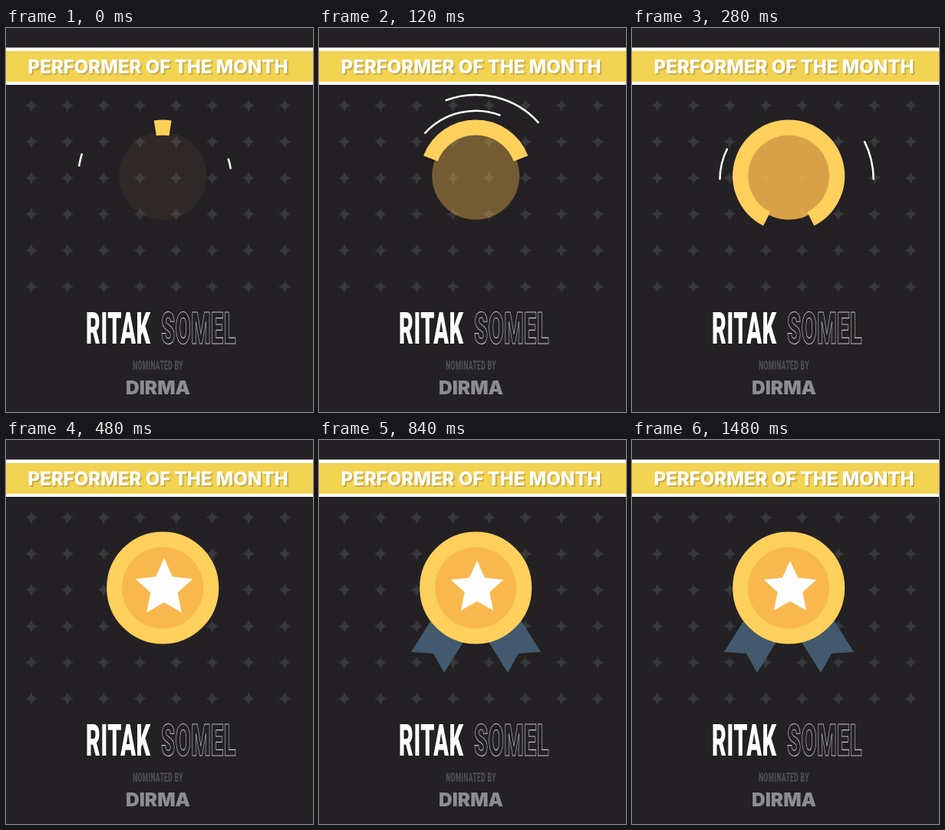
Recreate the animation shown at these times as an HTML page. Size 400 by 500 pixels, loop 1.52 s.

```html
<!DOCTYPE html>
<html lang="en">
<head>
<meta charset="utf-8">
<title>Performer of the month</title>
<style>
  html, body { margin: 0; height: 100%; overflow: hidden; background: #232124; }
  svg { display: block; width: 100vw; height: 100vh; }
  text { font-family: Inter, sans-serif; font-weight: 900; }
  .title { font-size: 24px; font-weight: 800; fill: #fff; text-anchor: middle;
    filter: drop-shadow(2px 2px .3px #c9ad48); }
  .narrow text { font-family: Roboto, sans-serif; }
  .name { font-size: 58px; letter-spacing: 1px; }
  .outline { fill: none; stroke: #c8c8ca; stroke-width: 1.1px; }
  .label { font-size: 17px; letter-spacing: .7px; fill: #4e4d50; text-anchor: middle; }
  .nominator { font-size: 24.5px; fill: #8d8c8e; text-anchor: middle; }
  .streak { fill: none; stroke: #fff; stroke-width: 2.5px; }
</style>
</head>
<body>
<svg viewBox="0 0 400 500">
  <defs>
    <pattern id="sparkles" x="9.4" y="77.4" width="47.17" height="47.17" patternUnits="userSpaceOnUse">
      <path transform="translate(23.6 23.6)" fill="#39383b"
        d="M0-8.5Q1.3-1.3 8.5 0Q1.3 1.3 0 8.5Q-1.3 1.3-8.5 0Q-1.3-1.3 0-8.5Z"/>
    </pattern>
  </defs>
  <rect width="400" height="500" fill="#232124"/>
  <rect x="9.4" y="77.4" width="377.3" height="283" fill="url(#sparkles)"/>

  <rect y="25.5" width="400" height="48.5" fill="#fff"/>
  <rect y="30" width="400" height="40" fill="#f3d352"/>
  <text class="title" x="198" y="59">PERFORMER OF THE MONTH</text>

  <g id="ribbons" fill="#42596e">
    <path id="left" d="M120 276L149 278L163 303L205 236L162 209Z"/>
    <path id="right" d="M289 276L260 278L246 303L204 236L247 209Z"/>
  </g>
  <circle id="disc" cx="204.2" cy="192.5" r="57" fill="#f8b84e"/>
  <path id="ring" fill="none" stroke="#ffd05c" stroke-width="20"/>
  <path id="star" fill="#fdfdfe"/>
  <path id="outer" class="streak"/>
  <path id="inner" class="streak"/>

  <g class="narrow" transform="scale(.5 1)">
    <text class="name" x="208" y="411.5" fill="#fff">RITAK</text>
    <text class="name outline" x="404" y="411.5">SOMEL</text>
    <text class="label" x="396" y="445.5">NOMINATED BY</text>
  </g>
  <text class="nominator" x="198" y="477">DIRMA</text>
</svg>
<script>
  const LOOP = 1520, STEP = 40, CX = 204.2;
  const el = id => document.getElementById(id);
  const clamp = v => Math.min(1, Math.max(0, v));
  const progress = (t, start, end) => clamp((t - start) / (end - start));
  const easeOutBack = (u, s) => 1 + (s + 1) * (u - 1) ** 3 + s * (u - 1) ** 2;

  // Point on a circle, angle in degrees clockwise from the top.
  const polar = (cx, cy, r, deg) => {
    const a = deg * Math.PI / 180;
    return `${(cx + r * Math.sin(a)).toFixed(2)} ${(cy - r * Math.cos(a)).toFixed(2)}`;
  };
  const arc = (cy, r, from, to) =>
    `M${polar(CX, cy, r, from)}A${r} ${r} 0 ${+(to - from > 180)} 1 ${polar(CX, cy, r, to)}`;
  const setPath = (id, d) => el(id).setAttribute('d', d);

  // Piecewise linear value through [time, value] keys.
  function track(t, keys) {
    const i = keys.findIndex(k => k[0] > t);
    if (i < 0) return keys.at(-1)[1];
    const [t0, v0] = keys[i - 1], [t1, v1] = keys[i];
    return v0 + (v1 - v0) * (t - t0) / (t1 - t0);
  }
  const DRAW = [[0, .05], [80, .25], [200, .65], [280, .85], [340, 1]];

  const starPoints = Array.from({ length: 10 }, (_, i) => polar(0, 0, i % 2 ? 17 : 36, i * 36));
  setPath('star', `M${starPoints.join('L')}Z`);

  function render(t) {
    const p = track(t, DRAW);
    el('disc').setAttribute('opacity', p);
    const half = p < 1 ? 180 * p : 181;
    setPath('ring', arc(192.5, 63, -half, 0) + arc(192.5, 63, 0, half));

    // Streaks sweep a half circle in opposite directions, the head twice as fast as the tail.
    const tail = 180 * p - 90, head = 180 * Math.min(1, 2 * p) - 90;
    setPath('outer', p < 1 ? arc(197.5, 110.5, tail, head) : '');
    setPath('inner', p < 1 ? arc(197.5, 89.7, -head, -tail) : '');

    const pop = progress(t, 320, 560);
    const size = pop && easeOutBack(pop, 1.70158);
    el('star').setAttribute('transform', `translate(206 193) scale(${size})`);

    const slide = progress(t, 560, 800);
    const back = 65 * (1 - easeOutBack(slide, 2.5));
    el('ribbons').style.visibility = slide ? 'visible' : 'hidden';
    el('left').setAttribute('transform', `translate(${.53 * back} ${-.85 * back})`);
    el('right').setAttribute('transform', `translate(${-.53 * back} ${-.85 * back})`);
  }

  const start = performance.now();
  function tick() {
    const t = (performance.now() - start) % LOOP;
    render(Math.floor(t / STEP) * STEP);
    requestAnimationFrame(tick);
  }
  tick();
</script>
</body>
</html>
```
